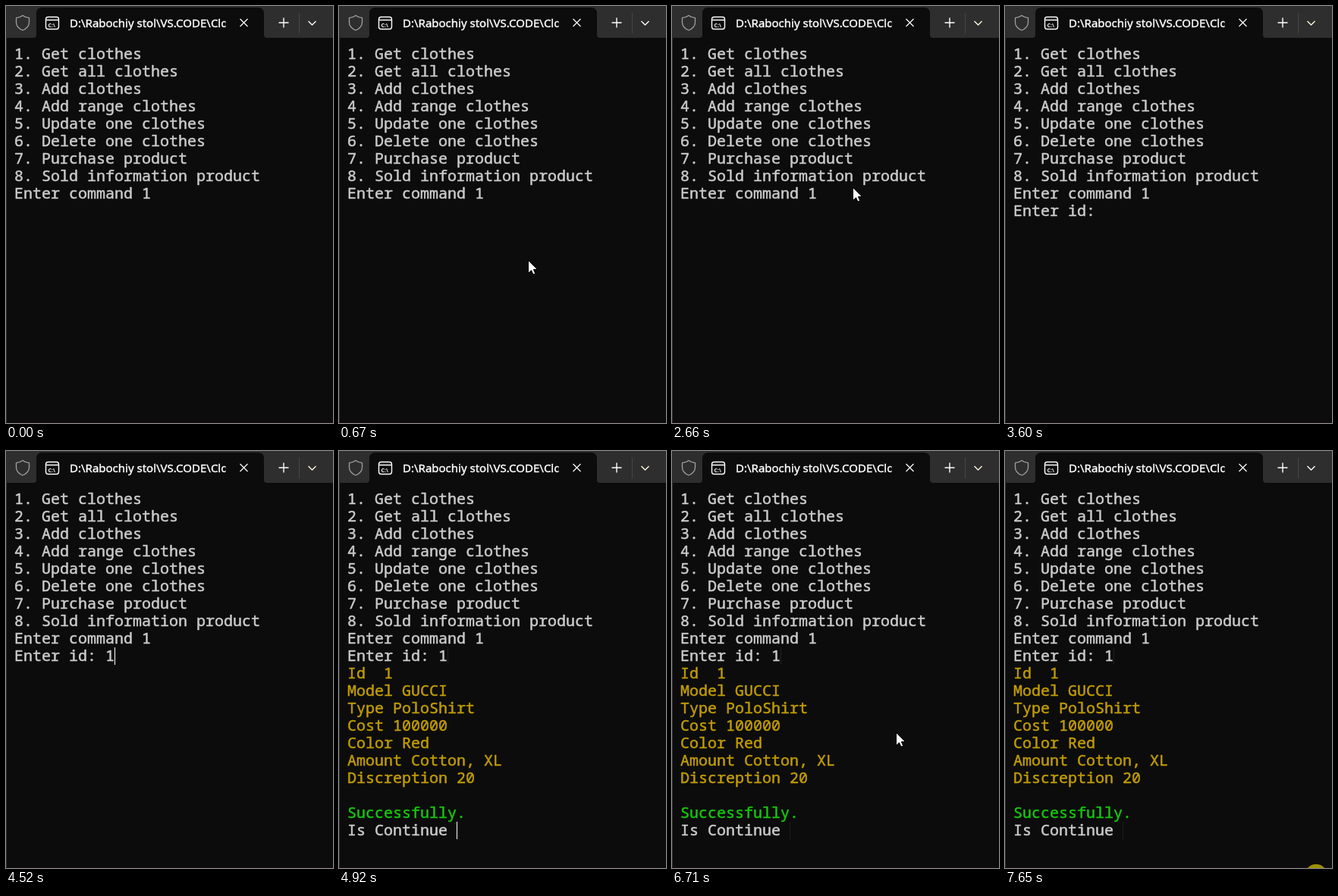
Animation, 431 px wide and 550 px high, one loop 7.85 s. Source, as an HTML page with a canvas:

```html
<!DOCTYPE html>
<html lang="en">
<head>
<meta charset="utf-8">
<title>Console</title>
<style>
html, body { margin: 0; width: 100%; height: 100%; overflow: hidden; background: #0c0c0c; }
canvas { display: block; }
</style>
</head>
<body>
<canvas id="stage" width="431" height="550"></canvas>
<script>
const ctx = document.getElementById('stage').getContext('2d');
const LOOP = 7850, LEFT = 11, TOP = 52, CELL = 12, ROW = 23;
const GREY = '#cccccc', GOLD = '#c19c00', GREEN = '#16c60c', WHITE = '#ffffff';

const menu = ['1. Get clothes', '2. Get all clothes', '3. Add clothes', '4. Add range clothes',
  '5. Update one clothes', '6. Delete one clothes', '7. Purchase product',
  '8. Sold information product', 'Enter command 1'];
const record = ['Id  1', 'Model GUCCI', 'Type PoloShirt', 'Cost 100000', 'Color Red',
  'Amount Cotton, XL', 'Discreption 20'];

// Text caret: from, to, column, row
const carets = [[2130, 2660, 15, 8], [2990, 3600, 10, 9], [4120, 4520, 10, 9], [4520, 4920, 11, 9],
  [4920, 5580, 12, 19], [6180, 6710, 12, 19], [7250, 7650, 12, 19]];

const between = (t, a, b) => t >= a && t < b;
const mix = (a, b, k) => a + (b - a) * k;

function line(color, width, d) {
  ctx.strokeStyle = color;
  ctx.lineWidth = width;
  ctx.stroke(new Path2D(d));
}

function box(color, x, y, w, h) {
  ctx.fillStyle = color;
  ctx.fillRect(x, y, w, h);
}

// Text with slightly heavier strokes than the regular weight.
function write(text, x, y, color, extra) {
  ctx.fillStyle = ctx.strokeStyle = color;
  ctx.lineWidth = extra;
  ctx.lineJoin = 'round';
  ctx.fillText(text, x, y);
  ctx.strokeText(text, x, y);
}

function print(text, row, color = GREY) {
  write(text, LEFT, TOP + 18 + row * ROW, color, .5);
}

function caret(col, row, color = WHITE) {
  box(color, LEFT + col * CELL, TOP + row * ROW, 1, ROW);
}

function titleBar(focused) {
  box('#2e2e2e', 0, 0, 431, 42);
  ctx.fillStyle = '#0c0c0c';
  ctx.fill(new Path2D('M36 42Q40 42 40 38V10Q40 2 48 2H332Q340 2 340 10V38Q340 42 344 42Z'));

  line('#a0a0a0', 1.3, 'M22 12.5Q26 15.6 30.5 15.7V21.5Q30.5 28.5 22 32Q13.5 28.5 13.5 21.5V15.7Q18 15.6 22 12.5Z');
  line(WHITE, 1.4, 'M55.5 14.5H66.5Q69.5 14.5 69.5 17.5V27.5Q69.5 30.5 66.5 30.5H55.5Q52.5 30.5 52.5 27.5V17.5Q52.5 14.5 55.5 14.5ZM52.5 18.5H69.5');
  ctx.fillStyle = WHITE;
  ctx.font = 'bold 7px "Noto Sans", sans-serif';
  ctx.fillText('C:\\', 55.5, 27.5);

  ctx.save();
  ctx.beginPath();
  ctx.rect(84, 4, 205.5, 36);
  ctx.clip();
  ctx.font = '15px "Noto Sans", sans-serif';
  write('D:\\Rabochiy stol\\VS.CODE\\Clothes', 84, 28, WHITE, .4);
  ctx.restore();

  line(WHITE, 1.2, 'M308.5 17L318.5 27M318.5 17L308.5 27');
  line(WHITE, 1.4, 'M359.5 22H372.5M366 15.5V28.5');
  line('#464646', 1, 'M386.5 9V36');
  line(focused ? '#fff8dc' : WHITE, 1.4, 'M398.5 20L403.5 25L408.5 20');
}

function consoleText(t) {
  ctx.font = '500 20px "Noto Sans Mono", monospace';
  menu.forEach((text, i) => print(text, i));
  if (t >= 2990) print(t < 4520 ? 'Enter id:' : 'Enter id: 1', 9);
  if (t >= 4920) {
    record.forEach((text, i) => print(text, 10 + i, GOLD));
    print('Successfully.', 18, GREEN);
    print('Is Continue', 19);
    caret(11, 9, '#1e1e1e');
    caret(12, 19, '#1e1e1e');
  }
  for (const [from, to, col, row] of carets) if (between(t, from, to)) caret(col, row);
}

function pointerAt(t) {
  if (between(t, 400, 1460)) {
    const left = 1 - Math.min(8, Math.floor((t - 400) / 67.5)) / 8;
    return [mix(217, 371, left ** 2.25), mix(278, 504, left ** 2)];
  }
  if (between(t, 1460, 1540)) return [228, 259];
  if (between(t, 1540, 2990)) return [238, 239];
  if (t >= 6450) {
    const k = Math.min(9, Math.floor((t - 6450) / 65.5)) / 9;
    return [mix(238, 410, k), mix(276, 560, k)];
  }
  return null;
}

function pointer([x, y]) {
  ctx.save();
  ctx.translate(Math.round(x) + .5, Math.round(y) + .5);
  const arrow = 'M0 0V17L4 13.2L6.4 18.6L9.2 17.4L6.9 12H12Z';
  ctx.fillStyle = WHITE;
  ctx.fill(new Path2D(arrow));
  line('#000000', 1, arrow);
  ctx.restore();
}

function draw(now) {
  const t = now % LOOP;
  box('#0c0c0c', 0, 0, 431, 550);
  box('#363636', 0, 42, 1, 508);
  box('#180a10', 0, 549, 431, 1);
  titleBar(between(t, 2130, 7650));
  consoleText(t);

  const at = pointerAt(t);
  if (between(t, 2130, 2330) || t >= 7650) {
    ctx.fillStyle = 'rgba(255, 235, 0, .6)';
    ctx.beginPath();
    ctx.arc(...at, 15, 0, Math.PI * 2);
    ctx.fill();
  }
  if (at) pointer(at);
}

const start = performance.now();
function tick() {
  draw(performance.now() - start);
  requestAnimationFrame(tick);
}
tick();
</script>
</body>
</html>
```
